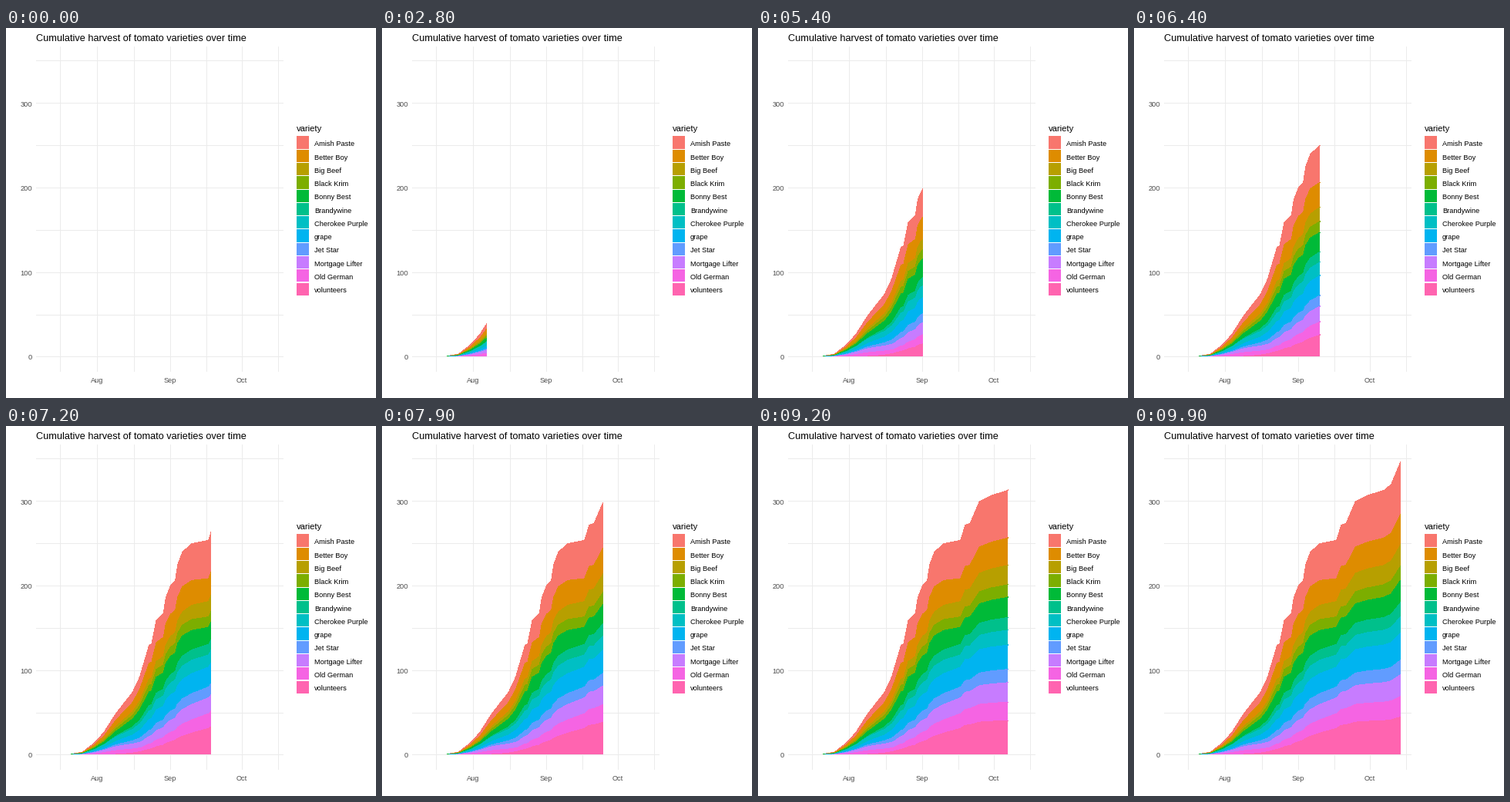
These frames come from a looping animation (480x480 px, 10000 ms). A matplotlib script:

```python
import math

import matplotlib.pyplot as plt
import numpy as np
from matplotlib.animation import FuncAnimation
from matplotlib.patches import Polygon, Rectangle

SIZE, FRAMES, INTERVAL = 480, 100, 100
FIRST_DAY, LAST_DAY = 10, 95        # days since 11 July
DAY_PX, UNIT_PX = 3.081, 1.097
LEFT, FLOOR = 53.3, 426
KEY_STEP = 17.28
GRID, GREY = "#EBEBEB", "#4D4D4D"

# Colour, then relative share of the harvest on each of the MIX_DAYS.
MIX_DAYS = [28, 40, 70]
VARIETIES = {
    "Amish Paste": ("#F8766D", 16, 16, 18),
    "Better Boy": ("#DE8C00", 15, 15, 10.3),
    "Big Beef": ("#B79F00", 6, 5.5, 7.3),
    "Black Krim": ("#7CAE00", 6, 6, 4.8),
    "Bonny Best": ("#00BA38", 11, 13, 7.6),
    "Brandywine": ("#00C08B", 2, 5, 4.8),
    "Cherokee Purple": ("#00BFC4", 11, 8, 5.6),
    "grape": ("#00B4F0", 8, 10, 9.2),
    "Jet Star": ("#619CFF", 4, 5.5, 5),
    "Mortgage Lifter": ("#C77CFF", 10, 7, 7.4),
    "Old German": ("#F564E3", 10, 4.5, 7),
    "volunteers": ("#FF64B0", 1, 4.5, 13),
}

# Cumulative total at the start and end of each spell of picking.
TOTAL = [(10, 1), (15, 3.5), (20, 14.5), (24, 27), (29, 49), (36, 74),
         (39, 92), (43, 130), (44, 131), (46, 159), (49, 167), (50, 186),
         (52, 200), (54, 206), (55, 225), (57, 240), (61, 250), (68, 254),
         (70, 272), (72, 274), (76, 300), (81, 307), (88, 313), (91, 320),
         (95, 347)]

mix = np.array([row[1:] for row in VARIETIES.values()])
stacked = np.cumsum(mix[::-1], axis=0)[::-1] / mix.sum(axis=0)


def layer_tops(days):
    """Pixel height of the top of every layer on the given days."""
    total = np.interp(days, *zip(*TOTAL))
    return [np.minimum(FLOOR, FLOOR + 0.9 - UNIT_PX * total
                       * np.interp(days, MIX_DAYS, share))
            for share in stacked]


plt.rcParams["font.family"] = "Liberation Sans"
fig = plt.figure(figsize=(SIZE / 72, SIZE / 72), dpi=72, facecolor="white")
ax = fig.add_axes([0, 0, 1, 1])
ax.set(xlim=(0, SIZE), ylim=(SIZE, 0))
ax.axis("off")


def box(x, y, w, h, color):
    ax.add_patch(Rectangle((x, y), w, h, fc=color, lw=0, antialiased=False))


def label(x, y, text, size, color="black", ha="left"):
    ax.text(x, y, text, fontsize=size, color=color, ha=ha, va="baseline")


for x in (70, 118, 166, 213, 260, 306, 353):
    box(x, 24, 1, 422, GRID)
for i in range(8):
    box(39, round(426.4 - 54.9 * i), 321, 1, GRID)

label(39, 17, "Cumulative harvest of tomato varieties over time", 12.75)
for i in range(4):
    label(34, round(430.4 - 109.5 * i), str(100 * i), 9.2, GREY, "right")
for month, x in (("Aug", 118), ("Sep", 213), ("Oct", 305.5)):
    label(x, 460, month, 9.3, GREY, "center")

label(377, 134, "variety", 11.2)
for i, (name, (color, *_)) in enumerate(VARIETIES.items()):
    top = math.ceil(139.95 + KEY_STEP * i)
    bottom = math.ceil(156.2 + KEY_STEP * i)
    box(377, top, 16, bottom - top, color)
    label(400, round(153.24 + KEY_STEP * i), name, 9.3)

# Each layer reaches down to the floor and is covered by the ones below it.
layers = [ax.add_patch(Polygon([(0, 0)] * 3, fc=color, lw=0, antialiased=False,
                               visible=False, zorder=2))
          for color, *_ in VARIETIES.values()]


def draw(frame):
    now = LAST_DAY * frame / (FRAMES - 1)
    shown = now > FIRST_DAY
    for layer in layers:
        layer.set_visible(shown)
    if shown:
        # The leading edge snaps to whole days while its height moves on.
        past = np.arange(FIRST_DAY, math.ceil(now))
        xs = LEFT + DAY_PX * np.append(past, round(now))
        xs[-1] = round(xs[-1])
        for layer, top in zip(layers, layer_tops(np.append(past, now))):
            outline = list(zip(xs, top))
            layer.set_xy(outline + [(xs[-1], FLOOR), (xs[0], FLOOR)])
    return layers


anim = FuncAnimation(fig, draw, frames=FRAMES, interval=INTERVAL,
                     repeat=True, repeat_delay=0, blit=False)
plt.show()
```
